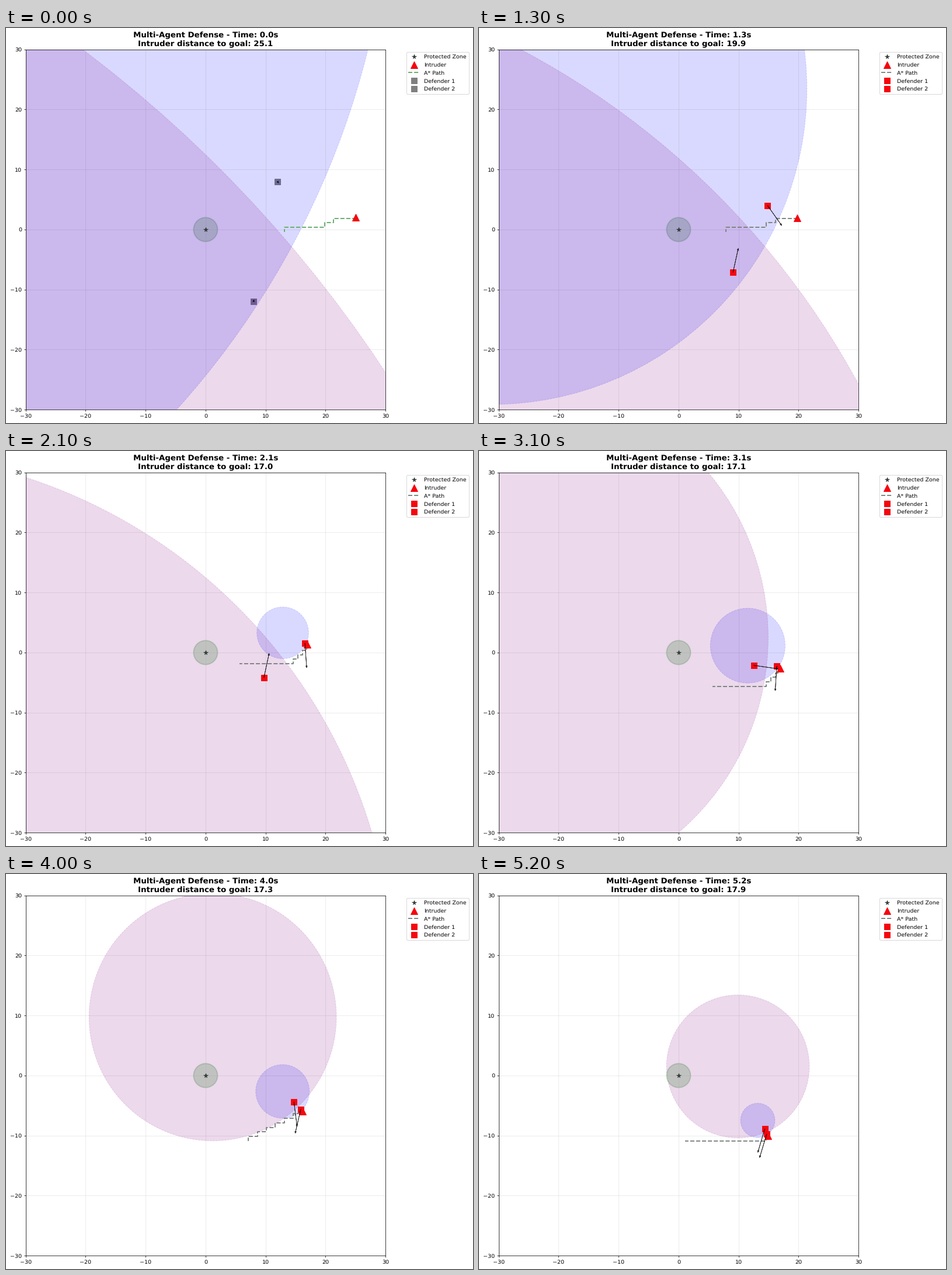
A matplotlib script that plays this animation: 800 by 676 pixels, repeating every 5300 ms.

```python
import numpy as np
import matplotlib.pyplot as plt
from matplotlib.animation import FuncAnimation
from matplotlib.patches import Circle, FancyArrow

plt.rcParams.update({"font.family": "DejaVu Sans", "text.hinting": "none"})

WIDTH, HEIGHT, DPI = 800, 676, 68.5
FRAMES, INTERVAL = 53, 100

INTRUDER_SPEED, DEFENDER_SPEED = 4.0, 3.8
RATIO = INTRUDER_SPEED / DEFENDER_SPEED
CONTACT = 2.1                     # seconds until defender 1 reaches the intruder
CELL, MOVES = 0.75, 19            # planner grid and visible route length
RED, GRAY = "#f5060e", "gray"


def polar(radius, degrees):
    angle = np.radians(degrees)
    return radius * np.array([np.cos(angle), np.sin(angle)])


def approach(start, end, t):
    return np.array(start) + (np.array(end) - start) * t / CONTACT


def intruder_at(t):
    """Runs straight at the zone, then skirts it on a widening arc."""
    if t < 2:
        return np.array([25 - INTRUDER_SPEED * t, 2 - 0.07 * t])
    s = t - CONTACT
    return polar(17.025 + 0.07 * s + 0.0072 * s**4,
                 4.6 - 13.95 * s + 0.49 * s**2)


def shadow_at(t):
    """Defender 1: intercepts, then shadows the intruder from the inside."""
    if t < CONTACT:
        return approach((12, 8), shadow_at(CONTACT), t)
    s = t - CONTACT
    return intruder_at(t) + polar(0.64 * np.exp(-0.37 * abs(s - 1)),
                                  155 - 10.2 * s)


def chaser_at(t):
    """Defender 2: straight run, a steady turn, then a shallow curve."""
    if t < CONTACT:
        return approach((8, -12), chaser_at(CONTACT), t)
    radius, turn_end = 2.532, 4.0
    rate = np.degrees(DEFENDER_SPEED / radius)
    s = min(t, turn_end) - CONTACT
    turn = np.array([12.213, -4.645]) + polar(radius, 168.7 - rate * s)
    u = max(t - turn_end, 0)
    return turn + np.array([0.484 * u - 0.654 * u**2, -3.72 * u])


def heading(path, t, dt=0.02):
    step = path(t + dt) - path(t)
    return step / np.hypot(*step)


def route(start, t):
    """Grid route: left first, or a staircase of drops before a long run."""
    if t < 2:
        moves = "LLLLLDLLD" + 9 * "L" + "D"
    else:
        drops, run = ((4, 1) if t < 3.55 else (7, 2) if t < 4.35
                      else (2, 2) if t < 4.95 else (1, 1))
        moves = (drops * ("D" + run * "L") + MOVES * "L")[:MOVES]
    steps = [(-CELL, 0) if m == "L" else (0, -CELL) for m in moves]
    first = (np.floor(start / CELL) + 0.5) * CELL
    return np.cumsum([first, *steps], axis=0).T


def apollonius(defender, intruder):
    """Region the defender reaches before the intruder."""
    gap = defender - intruder
    scale = RATIO**2 - 1
    return defender + gap / scale, RATIO * np.hypot(*gap) / scale


fig = plt.figure(figsize=((WIDTH + 1e-6) / DPI, (HEIGHT + 1e-6) / DPI), dpi=DPI,
                 facecolor="white")
left, bottom, side = 33.7, 653.1, 616.4
ax = fig.add_axes([left / WIDTH, 1 - bottom / HEIGHT, side / WIDTH, side / HEIGHT])
ax.set(xlim=(-30, 30), ylim=(-30, 30))
ax.grid(True, alpha=0.3)
title = ax.set_title("", fontsize=14, fontweight="bold")

ax.add_patch(Circle((0, 0), 2, color="green", alpha=0.2, lw=2))
zones = [ax.add_patch(Circle((0, 0), 1, color=c, alpha=0.15, ls="--", zorder=2.5))
         for c in ("blue", "purple")]

ax.plot(0, 0, "*", ms=8, mfc="#2d4637", mec="#282d2a", mew=0.8, ls="none",
        zorder=3, label="Protected Zone")
intruder_mark, = ax.plot([], [], "^", ms=12, color=RED, zorder=4, label="Intruder")
path_line, = ax.plot([], [], "--", lw=2, zorder=3, label="A* Path")
defender_marks = [ax.plot([], [], "s", ms=11.4, label=f"Defender {n}")[0]
                  for n in (1, 2)]
arrows = [ax.add_patch(FancyArrow(0, 0, 1, 0, width=0.001, head_width=0.25,
                                  head_length=0.3, color="black", lw=0.8,
                                  alpha=0.8, joinstyle="round", zorder=6))
          for _ in range(2)]
legend = ax.legend(bbox_to_anchor=(1.05, 1), loc="upper left", fontsize=10,
                   labelspacing=0.53)
_, _, key_path, *key_defenders = legend.legend_handles


def update(frame):
    t = frame / 10
    waiting = frame == 0
    intruder = intruder_at(t)

    intruder_mark.set_data([intruder[0]], [intruder[1]])
    path_line.set_data(*route(intruder, t))
    for line in (path_line, key_path):
        line.set_color("#66ad6c" if waiting else "#7b847f")

    for path, mark, key, zone, arrow in zip(
            (shadow_at, chaser_at), defender_marks, key_defenders, zones, arrows):
        pos = path(t)
        mark.set_data([pos[0]], [pos[1]])
        mark.set_zorder(2 if waiting else 5)
        for artist in (mark, key):
            artist.set_color(GRAY if waiting else RED)
        center, radius = apollonius(pos, intruder)
        zone.set_center(center)
        zone.set_radius(radius)
        dx, dy = heading(path, t) * (0.001 if waiting else DEFENDER_SPEED)
        arrow.set_data(x=pos[0], y=pos[1], dx=dx, dy=dy)

    title.set_text(f"Multi-Agent Defense - Time: {t:.1f}s\n"
                   f"Intruder distance to goal: {np.hypot(*intruder):.1f}")
    return []


anim = FuncAnimation(fig, update, frames=FRAMES, interval=INTERVAL,
                     init_func=lambda: update(0), repeat=True, repeat_delay=0,
                     blit=False)
plt.show()
```
